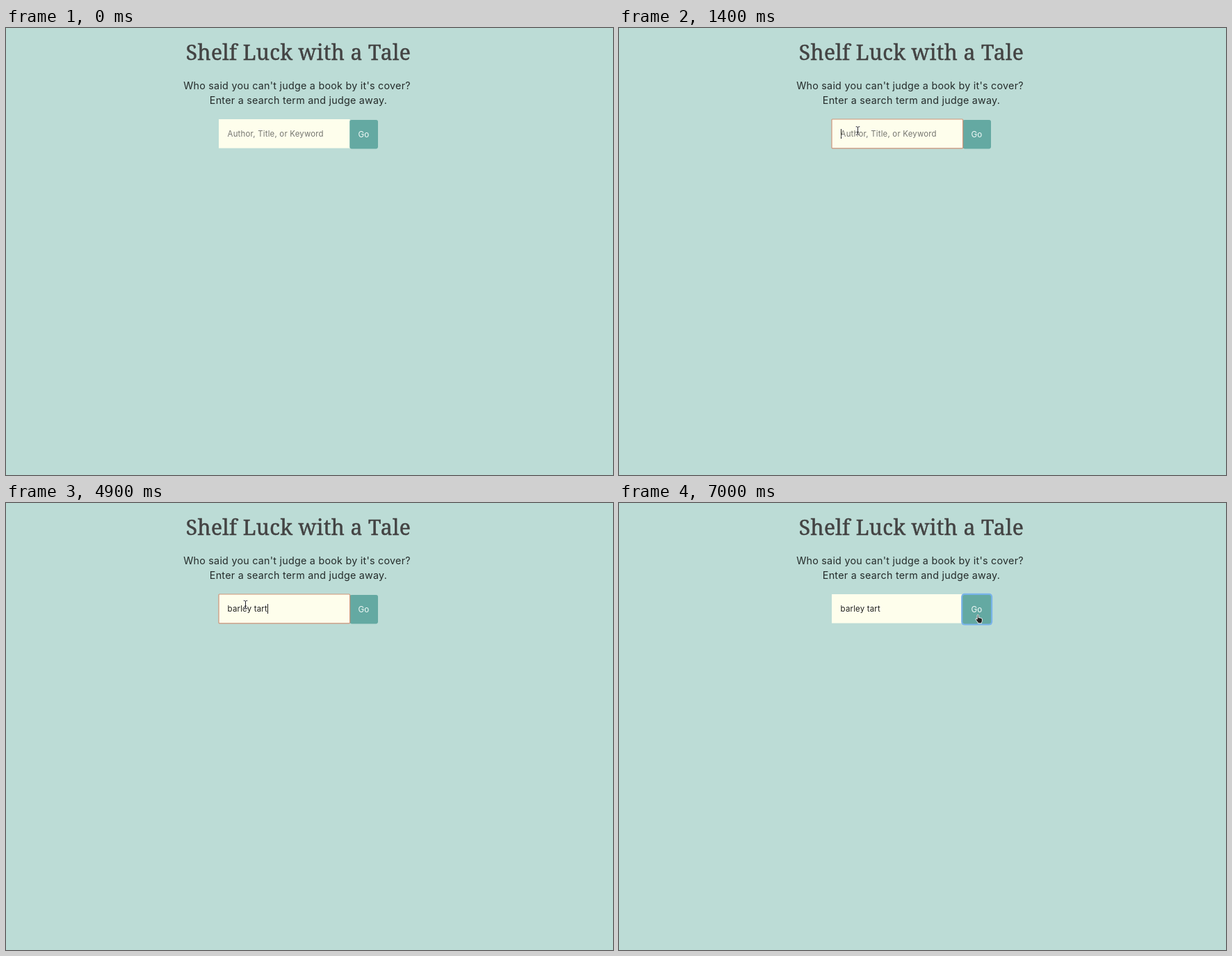
Recreate the animation shown at these times as an HTML page. Size 873 by 642 pixels, loop 8000 ms.

```html
<!DOCTYPE html>
<html lang="en">
<head>
<meta charset="utf-8">
<title>Shelf Luck with a Tale</title>
<style>
  html, body { margin: 0; width: 100%; height: 100%; overflow: hidden; background: #bcdcd6; }
  #stage { position: relative; width: 873px; height: 642px; overflow: hidden; }
  svg { position: absolute; left: 0; top: 0; }
  text, .line { font-family: Inter, "Open Sans", sans-serif; letter-spacing: .018em; }
  .title {
    font: 30px "Noto Serif", serif; letter-spacing: .4px;
    fill: #434343; stroke: #434343; stroke-width: .5px;
  }
  .lead { font-size: 14.3px; fill: #242b2a; }
  .go { font-size: 11.6px; fill: #f4fbf9; }
  .tip { font-size: 9px; fill: #333; letter-spacing: 0; }
  .line {
    position: absolute; left: 318.6px; top: 145px;
    font-size: 11.4px; line-height: 14px; white-space: pre; color: #1f1f1f;
  }
  #caret {
    display: inline-block; width: 1px; height: 14px;
    margin-right: -1px; background: #222; vertical-align: top;
  }
  #hint { color: #757570; }
</style>
</head>
<body>
<div id="stage">
  <svg width="873" height="642" viewBox="0 0 873 642">
    <g text-anchor="middle">
      <text class="title" x="420.5" y="46">Shelf Luck with a Tale</text>
      <text class="lead" x="418.5" y="88">Who said you can't judge a book by it's cover?</text>
      <text class="lead" x="420.5" y="109">Enter a search term and judge away.</text>
    </g>
    <rect x="306" y="131" width="188.5" height="41.6" fill="#fefeec"/>
    <rect id="ring" fill="#78b3e9"/>
    <rect x="494.3" y="132" width="40.7" height="41.4" rx="2.8" fill="#64a9a2"/>
    <text class="go" x="514.5" y="156.7" text-anchor="middle">Go</text>
    <rect id="focus" x="306" y="131" width="188.6" height="41.8" rx="1" fill="none" stroke="#cf957b" stroke-width="1.2"/>
  </svg>

  <div class="line"><span id="typed"></span><span id="caret"></span><span id="hint">Author, Title, or Keyword</span></div>

  <svg width="873" height="642" viewBox="0 0 873 642">
    <g id="tip">
      <rect x="346.5" y="166.5" width="133" height="15.5" fill="#ececec" stroke="#c9cfcd" stroke-width=".7"/>
      <text class="tip" x="413" y="177.5" text-anchor="middle">Please fill out this field.</text>
    </g>
    <g id="arrow" stroke-linejoin="round">
      <path d="M0 0V12.2L2.8 9.6L4.7 13.8L6.6 13L4.8 8.9H8.7Z" fill="#111" stroke="#fff" stroke-width=".9"/>
    </g>
    <g id="beam" fill="none" stroke-linecap="round">
      <path id="beamShape" d="M-2.4-5.8Q-.5-5.8 0-4.8Q.5-5.8 2.4-5.8M0-4.8V4.8M-2.4 5.8Q-.5 5.8 0 4.8Q.5 5.8 2.4 5.8M-1.1 2H1.1" stroke="#fff" stroke-opacity=".6" stroke-width="2"/>
      <use href="#beamShape"/>
      <path d="M-2.4-5.8Q-.5-5.8 0-4.8Q.5-5.8 2.4-5.8M0-4.8V4.8M-2.4 5.8Q-.5 5.8 0 4.8Q.5 5.8 2.4 5.8M-1.1 2H1.1" stroke="#252525" stroke-width="1"/>
    </g>
    <g id="hand" stroke-linejoin="round">
      <path d="M-1.8-5Q-.9-6.4.1-5V-1.2Q1.2-2 2-.9Q3.2-1.5 3.9-.4Q5.4-.6 5.4 1V3.2Q5.2 4.6 4.5 5.4V6.8H-.8V5.5Q-2.2 4.2-4 1.2Q-4.1-.3-2.8 0L-1.8 1.1Z" fill="#222" stroke="#fff" stroke-width=".9"/>
    </g>
  </svg>
</div>
<script>
const LOOP = 8000, STEP = 100;
const PHRASE = "barley tart";
// [time, characters typed]
const KEYS = [[2700, 1], [2900, 2], [3200, 3], [3400, 4], [3600, 5], [4000, 6],
              [4200, 7], [4400, 9], [4600, 10], [4900, 11]];
// [time, x, y] of the pointer, joined by straight moves
const PATH = [[100, 21, 261], [300, 112, 233], [500, 232, 190], [700, 326, 160],
              [800, 345, 155], [900, 337, 154], [1000, 343.5, 147.5], [1700, 343.5, 147.5],
              [1800, 344.5, 146], [5800, 344.5, 146], [5900, 376, 142], [6100, 447.5, 137.5],
              [6300, 488, 146], [6500, 512, 160], [6600, 517, 166]];

const el = id => document.getElementById(id);
const show = (id, on) => { el(id).style.visibility = on ? "visible" : "hidden"; };
const within = (t, from, to) => t >= from && t < to;

function pointerAt(t) {
  const next = PATH.findIndex(p => p[0] > t);
  if (next < 0) return PATH[PATH.length - 1].slice(1);
  if (next === 0) return PATH[0].slice(1);
  const [t0, x0, y0] = PATH[next - 1], [t1, x1, y1] = PATH[next];
  const k = (t - t0) / (t1 - t0);
  return [x0 + (x1 - x0) * k, y0 + (y1 - y0) * k];
}

function drawPointer(t) {
  const [x, y] = pointerAt(t);
  const overField = within(x, 306, 494) && within(y, 131, 173);
  const kind = overField ? "beam" : x >= 494 ? "hand" : "arrow";
  for (const id of ["arrow", "beam", "hand"]) show(id, t >= 100 && id === kind);
  el(kind).setAttribute("transform", `translate(${x} ${y})`);
}

function drawRing(t) {
  const spread = t >= 7000 ? 2.2 : 1;
  const box = { x: 494.3 - spread, y: 132 - spread, rx: 2.8 + spread,
                width: 40.7 + 2 * spread, height: 41.4 + 2 * spread };
  for (const name in box) el("ring").setAttribute(name, box[name]);
  show("ring", t >= 6700);
}

function draw(now) {
  const t = Math.floor(now % LOOP / STEP + 1e-6) * STEP;
  const count = KEYS.reduce((n, [time, chars]) => t >= time ? chars : n, 0);
  el("typed").textContent = PHRASE.slice(0, count);
  el("hint").style.display = count ? "none" : "inline";
  show("caret", within(t, 1400, 1900) || within(t, 2600, 5500) || within(t, 6000, 6600));
  show("focus", within(t, 1400, 6700));
  show("tip", within(t, 1200, 1400));
  drawRing(t);
  drawPointer(t);
  requestAnimationFrame(draw);
}
draw(0);
</script>
</body>
</html>
```
